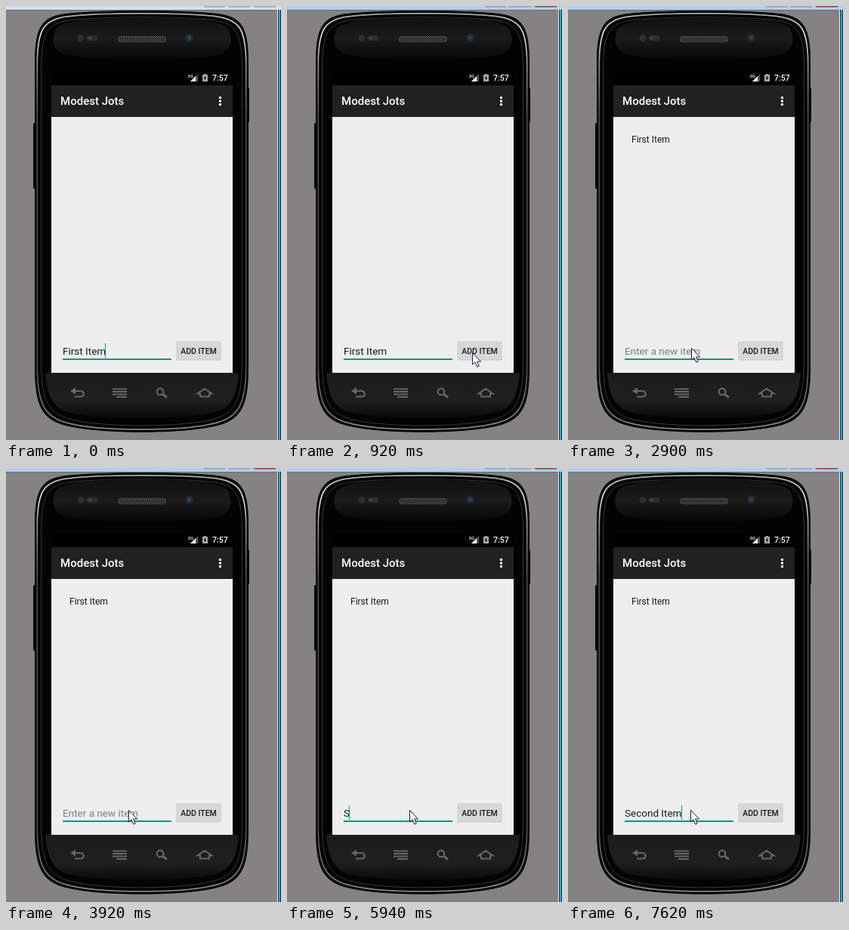
Recreate the animation shown at these times as an HTML page. Size 364x575 px, loop 8000 ms.

```html
<!DOCTYPE html>
<html lang="en">
<head>
<meta charset="utf-8">
<title>Todo list demo</title>
<style>
  html, body { margin: 0; width: 100%; height: 100%; overflow: hidden; background: #858283; }
  svg { display: block; width: 364px; height: 575px; }
  text { font-family: Roboto, sans-serif; white-space: pre; }
  .medium { font-weight: 500; }
  .ring { fill: none; vector-effect: non-scaling-stroke; }
</style>
</head>
<body>
<svg viewBox="0 0 364 575">
  <defs>
    <path id="body" vector-effect="non-scaling-stroke" d="M-141 -211C-141 -259 -131 -270 -104 -274.5C-60 -280.5 60 -280.5 104 -274.5C131 -270 141 -259 141 -211V194C141 244 131 261 104 269C60 282 -60 282 -104 269C-131 261 -141 244 -141 194Z"/>
    <linearGradient id="rim" x2="0" y2="1">
      <stop offset="0" stop-color="#a8a8a8"/><stop offset=".05" stop-color="#d8d8d8"/>
      <stop offset=".12" stop-color="#8a8a8a"/><stop offset=".25" stop-color="#484848"/>
      <stop offset=".85" stop-color="#484848"/><stop offset="1" stop-color="#858585"/>
    </linearGradient>
    <linearGradient id="glossTop" x2="0" y2="1">
      <stop offset="0" stop-color="#101010"/><stop offset=".5" stop-color="#1b1b1b"/><stop offset="1" stop-color="#050505"/>
    </linearGradient>
    <linearGradient id="glossBottom" x2="0" y2="1">
      <stop offset="0" stop-color="#1c1c1c"/><stop offset=".6" stop-color="#1f1f1f"/><stop offset="1" stop-color="#0a0a0a"/>
    </linearGradient>
    <pattern id="mesh" width="3" height="3" patternUnits="userSpaceOnUse">
      <path d="M0 0L3 3M3 0L0 3" stroke="#666" stroke-width=".7"/>
    </pattern>
    <clipPath id="buttonClip"><rect x="225" y="444" width="60" height="25" rx="1.5"/></clipPath>
  </defs>

  <!-- window frame -->
  <rect width="364" height="575" fill="#858283"/>
  <g id="frame">
    <rect width="364" height="5"/>
    <g stroke="#7d8a98">
      <rect x="261.5" y="-6" width="29" height="7" rx="2"/>
      <rect x="293.5" y="-6" width="30" height="7" rx="2"/>
      <rect id="close" x="327.5" y="-6" width="30" height="7" rx="2"/>
    </g>
  </g>
  <path d="M0 5.5H359" stroke="#6d6c70"/>
  <rect x="359" y="5" width="1" height="570" fill="#f4f8fa"/>
  <rect x="360" y="5" width="4" height="570" fill="#1b2a33"/>
  <rect x="361" y="5" width="2" height="570" fill="#2fa9c8"/>

  <!-- phone -->
  <rect x="36" y="155" width="5" height="87" rx="1.5" fill="#080808"/>
  <rect x="318" y="108" width="4" height="46" rx="1.5" fill="#080808"/>
  <g transform="translate(179.5 285.5)">
    <use href="#body" fill="#030303" stroke="#080808"/>
    <use href="#body" class="ring" transform="scale(.98 .988)" stroke="url(#rim)" stroke-width="1.8"/>
    <use href="#body" class="ring" transform="scale(.942 .97)" stroke="#383838"/>
  </g>
  <path d="M66 30C80 17 120 15 180 15S280 17 294 30C302 48 296 58 284 64C250 74 110 74 76 64C64 58 58 48 66 30Z" fill="url(#glossTop)"/>
  <path d="M52 486H308C306 512 300 529 282 537C240 549 120 549 78 537C60 529 54 512 52 486Z" fill="url(#glossBottom)"/>
  <rect x="148.5" y="40.5" width="63" height="7" rx="3" fill="#111"/>
  <rect x="148.5" y="40.5" width="63" height="7" rx="3" fill="url(#mesh)" stroke="#484848"/>
  <circle cx="99" cy="42.5" r="4.5" fill="#2b2e31"/>
  <rect x="107" y="39" width="14" height="7" rx="2.5" fill="#2b2e31"/>
  <rect x="109" y="41" width="4" height="3" fill="#444"/>
  <circle cx="242.5" cy="42" r="5.5" fill="#202a32"/>
  <circle cx="242.5" cy="42" r="2.5" fill="#2d4252"/>

  <!-- hardware keys -->
  <g fill="none" stroke="#666" stroke-width="2.2">
    <path d="M90 510H98.5C104 510.5 104 517.5 98.5 517.5H91"/>
    <path d="M92 505.5V514.5L85 510Z" fill="#666" stroke="none"/>
    <path d="M141 507.5H160M141 511H160M141 514.5H160M146 518H160" stroke-width="2"/>
    <circle cx="204" cy="511" r="4.3"/>
    <path d="M207.5 514.5L213 518.5" stroke-width="3"/>
    <path d="M253.5 513.5L263 507L272.5 513.5H269V517.5H257V513.5Z" stroke-width="2"/>
  </g>

  <!-- app -->
  <rect x="60" y="87" width="240" height="399" fill="#000"/>
  <rect x="60" y="105" width="240" height="42" fill="#212121"/>
  <rect x="60" y="147" width="240" height="339" fill="#eee"/>
  <g fill="#fff">
    <text x="240.5" y="95" font-size="6" class="medium">3G</text>
    <path d="M254 90V100H244Z" fill="#555"/>
    <path d="M251 93V100H244Z"/>
    <path d="M260 91H262V90H265V91H267V100H260Z" fill="#aaa"/>
    <path d="M264.5 91.5L261.5 96H263.2L262.5 99L265.5 95H263.800Z" fill="#111"/>
    <text x="273" y="99" font-size="10.5" class="medium">7:57</text>
    <text x="72" y="131" font-size="15" class="medium">Modest Jots</text>
    <circle cx="283.5" cy="121.5" r="1.7"/>
    <circle cx="283.5" cy="126" r="1.7"/>
    <circle cx="283.5" cy="130.5" r="1.7"/>
  </g>
  <text id="item" x="84" y="181" font-size="12" fill="#1a1a1a">First Item</text>
  <rect x="75" y="467" width="144" height="2" fill="#009688"/>
  <text id="input" x="75" y="462" font-size="13.5"></text>
  <rect id="caret" y="447" width="1" height="19"/>
  <rect x="225" y="445" width="60" height="24.5" rx="1.5" fill="#c8c8c8"/>
  <rect x="225" y="444" width="60" height="24.5" rx="1.5" fill="#d6d7d7"/>
  <ellipse id="ripple" cx="250" cy="458" rx="14" clip-path="url(#buttonClip)"/>
  <text x="255" y="461" font-size="10.5" class="medium" text-anchor="middle" fill="#1a1a1a">ADD ITEM</text>

  <path id="pointer" d="M.5 .5V16L4 12.8L6.7 19L9.2 18L6.6 12H11.5Z" fill="#fff" stroke="#1c1c2c"/>
</svg>
<script>
const LOOP = 8000;
const $ = id => document.getElementById(id);
const set = (id, attrs) => {
  for (const name in attrs) $(id).setAttribute(name, attrs[name]);
};

// Each row is [start time, value...]
const pointerSteps = [
  [0, -50, -50], [120, 297, 545], [260, 278, 518], [380, 257, 487],
  [530, 249, 467], [660, 245, 459], [2750, 181, 453], [2900, 163, 453], [3060, 162, 453]
];
const inputSteps = [
  [0, "First Item"], [1350, ""], [5940, "S"], [6090, "Se"], [6210, "Sec"],
  [6360, "Seco"], [6660, "Secon"], [6780, "Second "], [7070, "Second I"],
  [7340, "Second It"], [7470, "Second Ite"], [7620, "Second Item"]
];
const caretToggles = [530, 1080, 1790, 2350, 2900, 3310, 3920, 4350, 4920, 5350];
const current = (steps, t) => steps.filter(step => step[0] <= t).pop();

function draw(t) {
  const [, x, y] = current(pointerSteps, t);
  set("pointer", { transform: `translate(${x} ${y})` });

  const [, typed] = current(inputSteps, t);
  $("input").textContent = typed || "Enter a new item";
  set("input", { fill: typed ? "#1a1a1a" : "#7d7d7d" });
  const width = typed ? $("input").getComputedTextLength() : 0.2;
  const caretOn = caretToggles.filter(time => time <= t).length % 2 === 0;
  set("caret", {
    x: Math.floor(74.8 + width),
    fill: typed ? "#009688" : "#555",
    opacity: +caretOn
  });

  set("item", { opacity: +(t >= 1350) });
  set("ripple", { ry: t < 1350 ? 14 : 3, opacity: t >= 1220 && t < 1500 ? 0.05 : 0 });

  const focused = t >= 920;
  set("frame", { fill: focused ? "#b4cfeb" : "#d3e1ee" });
  set("close", {
    fill: focused ? "#b5635a" : "#d3e1ee",
    stroke: focused ? "#6b3330" : "#7d8a98"
  });
}

function tick() {
  draw(performance.now() % LOOP);
  requestAnimationFrame(tick);
}
tick();
</script>
</body>
</html>
```
